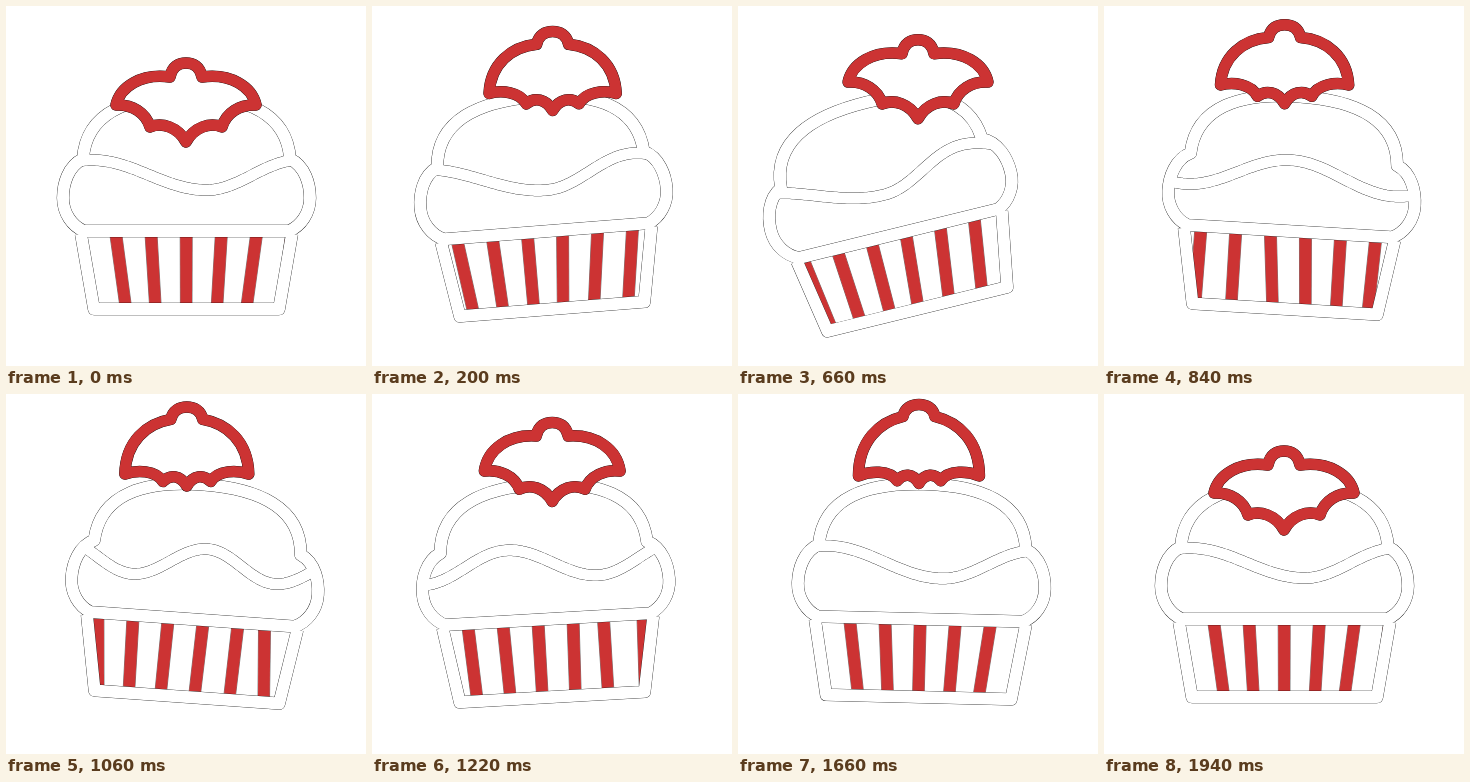
Recreate the animation shown at these times as an HTML page with a canvas. Size 360 by 360 pixels, loop 2.4 s.

```html
<!DOCTYPE html>
<html lang="en">
<head>
<meta charset="utf-8">
<title>Cupcake and bat</title>
<style>
html, body { margin: 0; width: 100%; height: 100%; overflow: hidden; background: #fff; }
canvas { display: block; width: 360px; height: 360px; }
</style>
</head>
<body>
<canvas id="stage" width="360" height="360"></canvas>
<script>
const LOOP = 2400, STEP = 20, REST = 1940, ACTIVE = 1960;
const RED = '#cc3333', EDGE = '#000', WHITE = '#fff';
const PIVOT = { x: 180.5, y: 308 };
const ctx = document.getElementById('stage').getContext('2d');

const mix = (a, b, u) => a + (b - a) * u;
const mixList = (a, b, u) => a.map((v, i) => mix(v, b[i], u));
const sine = u => (1 - Math.cos(Math.PI * u)) / 2;
const soft = u => (u + sine(u)) / 2;

// Finds the pair of keys around t and the eased position between them.
function between(keys, t, ease) {
  let i = 0;
  while (i < keys.length - 2 && t >= keys[i + 1][0]) i++;
  const [t0, a] = keys[i], [t1, b] = keys[i + 1];
  const u = Math.min(1, Math.max(0, (t - t0) / (t1 - t0)));
  return [a, b, ease(u)];
}

const TILT = [[0, 0], [580, -16.7], [935, 7.5], [1275, -4], [1500, 2], [1940, 0]];

// shift: stripe travel, enter: offset of the incoming stripe,
// slant: foot offset per stripe, wave: alternating crests and troughs.
const FRONT = { shift: 0, enter: 0,
  slant: [9, 4, 0, -4, -9, -9, -9, -9, -9, -9],
  wave: [-95, 20, 112, 210, 310, 410] };
const LEFT = { shift: -28, enter: 0,
  slant: [10, 5, 1, -5, -8, -9, -9, -9, -9, -9],
  wave: [-135, -5, 82, 180, 280, 380] };
const RIGHT = { shift: -124, enter: 0,
  slant: [9, 9, 9, -1, 0, 6, 4, 0, -3, -6],
  wave: [-210, -107, -4, 103, 206, 306] };
const RIGHT_END = { shift: -129, enter: -8,
  slant: [9, 9, 9, 5, 1, -2, -3, -3, 4, 4],
  wave: [-136, -63, 10, 80, 153, 226] };
const BACK = { shift: -175, enter: 0,
  slant: [9, 9, 9, 9, 9, 9, 4, 0, -4, -9],
  wave: [-300, -195, -95, 20, 112, 210] };
const SPIN = [[0, FRONT], [330, LEFT], [655, LEFT], [850, RIGHT],
  [1055, RIGHT_END], [1080, RIGHT_END], [1380, BACK], [1940, BACK]];

// Half of the bat, measured from the middle of its head.
const SPREAD = [0, 6, -7, 6, -14, 9, -16, 20, -45, 16, -66, 30, -70, 48,
  -54, 47, -40, 56, -36, 70, -24, 65, -8, 70, 0, 85];
const FOLDED = [0, 6, -7, 6, -14, 9, -16, 18, -39, 24, -60, 43, -60, 79,
  -49, 74, -29, 72, -21, 83, -15, 75, -6, 75, 0, 85];

const body = new Path2D(`M77 153 C80 105 125 90 180.5 90 C236 90 281 105 284 153
  C299 160 304 178 304 192 C304 207 295 220 283 225 H78
  C66 220 57 207 57 192 C57 178 62 160 77 153 Z`);
const cup = new Path2D('M75 228 L88 303 H273 L286 228');

function waveY(x, marks) {
  let i = 0;
  while (i < marks.length - 2 && x > marks[i + 1]) i++;
  const u = (x - marks[i]) / (marks[i + 1] - marks[i]);
  return 169 - 15 * Math.cos(Math.PI * (i + u));
}

function wavePath(marks) {
  const path = new Path2D();
  for (let x = -130; x <= 130; x += 2) path.lineTo(180.5 + x, waveY(x, marks));
  return path;
}

function stroke(path, width, color) {
  ctx.lineWidth = width;
  ctx.strokeStyle = color;
  ctx.stroke(path);
}

function clipped(shape, draw) {
  ctx.save();
  ctx.clip(shape);
  draw();
  ctx.restore();
}

function drawStripes(pose) {
  pose.slant.forEach((slant, i) => {
    const k = i - 2;
    const top = 180.2 + 35 * k + pose.shift + (k === 6 ? pose.enter : 0);
    const foot = top + slant;
    const path = new Path2D();
    path.moveTo(top - 6, 231);
    path.lineTo(top + 6, 231);
    path.lineTo(foot + 5.8, 297);
    path.lineTo(foot - 5.8, 297);
    path.closePath();
    stroke(path, 0.5, EDGE);
    ctx.fillStyle = RED;
    ctx.fill(path);
  });
}

function drawCake(t) {
  const [a, b, u] = between(SPIN, t, sine);
  const pose = {
    shift: mix(a.shift, b.shift, u),
    enter: mix(a.enter, b.enter, u),
    slant: mixList(a.slant, b.slant, u),
    wave: mixList(a.wave, b.wave, u)
  };
  const wave = wavePath(pose.wave);

  ctx.save();
  ctx.translate(PIVOT.x, PIVOT.y);
  ctx.rotate(mix(...between(TILT, t, sine)) * Math.PI / 180);
  ctx.translate(-PIVOT.x, -PIVOT.y);
  clipped(cup, () => drawStripes(pose));
  for (const [width, color] of [[12.5, EDGE], [12, WHITE]]) {
    clipped(body, () => stroke(wave, width - 1, color));
    stroke(cup, width, color);
    stroke(body, width, color);
  }
  ctx.restore();
}

function batPath(fold) {
  const half = mixList(SPREAD, FOLDED, fold);
  const pts = [];
  for (let i = 0; i < half.length; i += 2) pts.push([half[i], half[i + 1]]);
  const mirrored = pts.map(([x, y]) => [-x, y]).reverse();
  const path = new Path2D();
  path.moveTo(...pts[0]);
  for (const side of [pts, mirrored])
    for (let i = 1; i < side.length; i += 3)
      path.bezierCurveTo(...side[i], ...side[i + 1], ...side[i + 2]);
  path.closePath();
  return path;
}

function drawBat(t) {
  const beat = ACTIVE / 6;
  const n = Math.min(5, Math.floor(t / beat));
  const u = soft(t / beat - n);
  const fold = n % 2 ? 1 - u : u;
  const low = n === 0 || n === 5 ? 0 : -23;
  const path = batPath(fold);
  ctx.save();
  ctx.translate(180 + fold, 51 + mix(low, -49, fold));
  ctx.fillStyle = WHITE;
  ctx.fill(path);
  stroke(path, 11.5, EDGE);
  stroke(path, 11, RED);
  ctx.restore();
}

function draw(time) {
  const step = Math.floor((time % LOOP) / STEP) * STEP;
  const t = step >= REST ? 0 : step;
  ctx.fillStyle = WHITE;
  ctx.fillRect(0, 0, 360, 360);
  ctx.lineJoin = 'round';
  ctx.lineCap = 'butt';
  drawCake(t);
  drawBat(t);
}

const start = performance.now();
function tick() {
  draw(performance.now() - start);
  requestAnimationFrame(tick);
}
tick();
</script>
</body>
</html>
```
